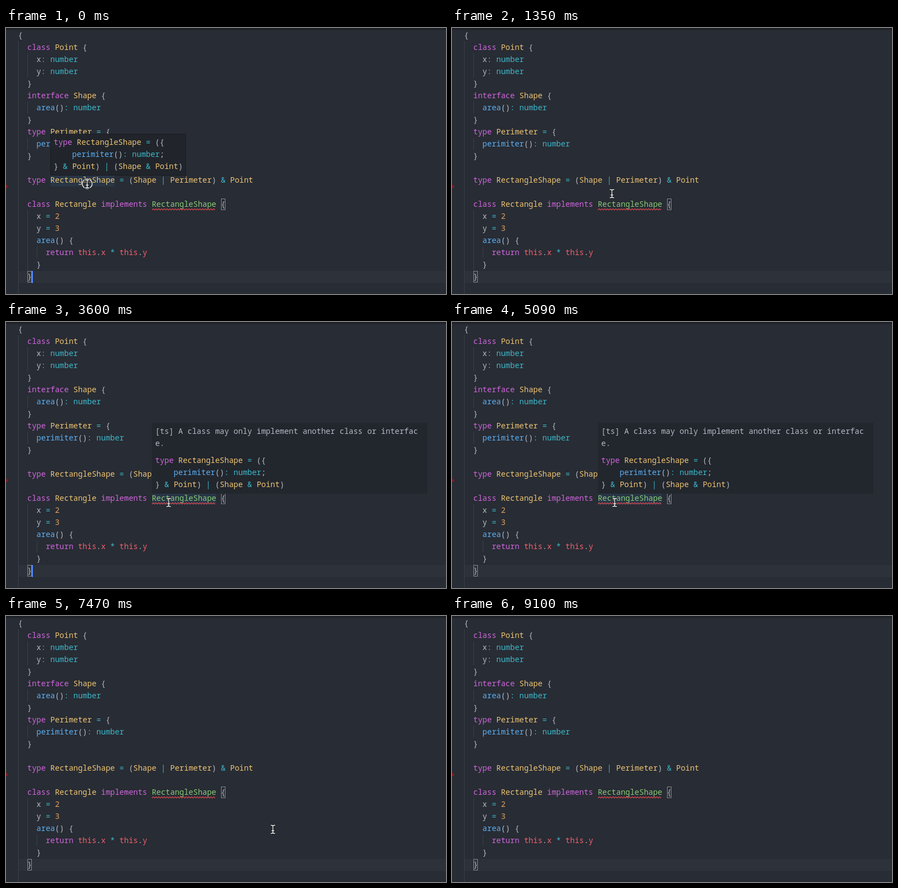
Animation of 802 by 485 pixels, one loop 9270 ms. Source, as an HTML page:

```html
<!DOCTYPE html>
<html lang="en">
<head>
<meta charset="utf-8">
<title>Editor hover</title>
<style>
  html, body { margin: 0; width: 100%; height: 100%; overflow: hidden; background: #282c34; }
  svg { display: block; }
  text { font: 14px "Noto Sans Mono", "DejaVu Sans Mono", monospace; white-space: pre; fill: #b4bac6; }
  .keyword { fill: #d066de; }
  .type { fill: #efc574; }
  .parent { fill: #89ca78; }
  .func { fill: #5cb0f5; }
  .teal { fill: #3cb8ca; }
  .digit { fill: #dfa05f; }
  .self { fill: #f2606e; }
  .guide { stroke: #3b4049; }
  .match { fill: none; stroke: #888b91; }
</style>
</head>
<body>
<svg id="stage" width="802" height="485" viewBox="0 0 802 485">
  <defs>
    <linearGradient id="shade" x2="0" y2="1">
      <stop offset="0" stop-color="#14161a" stop-opacity=".75"/>
      <stop offset="1" stop-color="#14161a" stop-opacity="0"/>
    </linearGradient>
  </defs>
  <rect width="802" height="485" fill="#282c34"/>
  <rect x="22" y="443" width="780" height="22" fill="#2c313a"/>
  <rect width="802" height="5" fill="url(#shade)"/>
  <path d="M0 285.5L5 289L0 292.5Z" fill="#7d2026"/>
  <g id="guides"></g>
  <rect id="wordA" x="81" y="267" width="117" height="22" fill="#283646"/>
  <rect id="wordB" x="266" y="311" width="117" height="22" fill="#283646"/>
  <g id="code"></g>
  <path id="squiggle" fill="none" stroke="#e5484d" stroke-width="1.1"/>
  <rect class="match" x="392.5" y="311.5" width="7" height="20"/>
  <rect class="match" x="39.5" y="443.5" width="7" height="20"/>
  <rect id="caret" x="47" y="443" width="2" height="22" fill="#528bff"/>
  <g id="hintA"><rect x="81.5" y="193.5" width="246" height="75" fill="#21252b" stroke="#181a1f"/></g>
  <g id="hintB"><rect x="266" y="184" width="502" height="129" fill="#22262d"/></g>
  <g id="mouse">
    <circle id="ring" r="9" fill="#282c34" fill-opacity=".45" stroke="#f4f4f4" stroke-width="1.4"/>
    <g id="beam" fill="none" stroke-linecap="round">
      <path id="beamShape" d="M-3.5 -7.5Q-.5 -7.5 0 -6Q.5 -7.5 3.5 -7.5M0 -6V6M-3.5 7.5Q-.5 7.5 0 6Q.5 7.5 3.5 7.5M-2 2.5H2"/>
    </g>
  </g>
</svg>
<script>
const LOOP = 9270, COLUMN = 8.4, LINE = 22, LEFT = 22;
const SVG = "http://www.w3.org/2000/svg";
const $ = id => document.getElementById(id);

function add(parent, tag, attributes, content) {
  const node = document.createElementNS(SVG, tag);
  for (const name in attributes) node.setAttribute(name, attributes[name]);
  if (content) node.textContent = content;
  return parent.appendChild(node);
}

const source = `{
  class Point {
    x: number
    y: number
  }
  interface Shape {
    area(): number
  }
  type Perimeter = {
    perimiter(): number
  }

  type RectangleShape = (Shape | Perimeter) & Point

  class Rectangle implements RectangleShape {
    x = 2
    y = 3
    area() {
      return this.x * this.y
    }
  }`.split("\n");

const hint = ["type RectangleShape = ({", "    perimiter(): number;", "} & Point) | (Shape & Point)"];

const rules = [
  ["parent", "(?<=implements )\\w+"],
  ["keyword", "\\b(?:class|interface|type|implements|return)\\b"],
  ["self", "\\bthis\\b|(?<=this\\.)\\w"],
  ["teal", "\\bnumber\\b|[=|&*:]"],
  ["func", "\\w+(?=\\()"],
  ["type", "[A-Z]\\w*"],
  ["digit", "\\d"]
];
const syntax = new RegExp(rules.map(([name, rule]) => `(?<${name}>${rule})`).join("|"), "g");

function writeCode(parent, line, x, y) {
  const text = add(parent, "text", { x, y });
  let end = 0;
  for (const match of line.matchAll(syntax)) {
    text.append(line.slice(end, match.index));
    const [kind] = rules.find(([name]) => match.groups[name]);
    add(text, "tspan", { class: kind }, match[0]);
    end = match.index + match[0].length;
  }
  text.append(line.slice(end));
}

function addGuide(column, top, bottom) {
  const x = Math.round(LEFT + column * COLUMN) + .5;
  add($("guides"), "path", { class: "guide", d: `M${x} ${top}V${bottom}` });
}

addGuide(0, 24, 485);
source.forEach((line, row) => {
  writeCode($("code"), line, LEFT, 18 + row * LINE);
  const indent = line.search(/\S/);
  for (let column = 2; column < indent; column += 2)
    addGuide(column, 2 + row * LINE, 2 + (row + 1) * LINE);
});

hint.forEach((line, row) => {
  writeCode($("hintA"), line, 87, 213 + row * LINE);
  writeCode($("hintB"), line, 272, 257 + row * LINE);
});
["[ts] A class may only implement another class or interfac", "e."].forEach((line, row) =>
  add($("hintB"), "text", { x: 272, y: 204 + row * LINE }, line));

let wave = "M266 332";
for (let x = 268.5, up = true; x <= 383; x += 2.5, up = !up) wave += `L${x} ${up ? 329.5 : 332}`;
$("squiggle").setAttribute("d", wave);

const beamPath = $("beamShape");
const beamTop = beamPath.cloneNode();
beamTop.removeAttribute("id");
beamPath.setAttribute("stroke", "#15171b");
beamPath.setAttribute("stroke-width", "3");
beamTop.setAttribute("stroke", "#fff");
beamTop.setAttribute("stroke-width", "1.3");
$("beam").append(beamTop);

// Times at which the caret toggles, starting visible.
const blinks = [150, 600, 1200, 1650, 2100, 2700, 3150, 3600, 4190, 4640, 5090,
  5680, 6130, 6580, 7180, 7610, 8050, 8650, 9100];

// The pointer jumps between captured positions: time, x, y.
const pointer = [
  [0, 148, 284], [1200, 220, 291], [1350, 291.5, 302], [1500, 296, 321], [1650, 296.5, 329],
  [6730, 312, 345], [7470, 486.5, 389], [7610, 606, 427], [7760, 700, 460], [7910, 764, 482], [8050, 802, 520]
];

function show(id, visible) {
  $(id).setAttribute("visibility", visible ? "visible" : "hidden");
}

function draw(time) {
  const within = (from, to) => time >= from && time < to;
  const [, x, y] = pointer.findLast(([start]) => start <= time);
  $("mouse").setAttribute("transform", `translate(${x} ${y})`);
  show("ring", time < 150);
  show("caret", blinks.filter(blink => blink <= time).length % 2 === 0);
  for (const id of ["hintA", "wordA"]) show(id, time < 1200);
  for (const id of ["hintB", "wordB"]) show(id, within(1950, 6730));
}

const start = performance.now();
function tick() {
  draw((performance.now() - start) % LOOP);
  requestAnimationFrame(tick);
}
tick();
</script>
</body>
</html>
```
